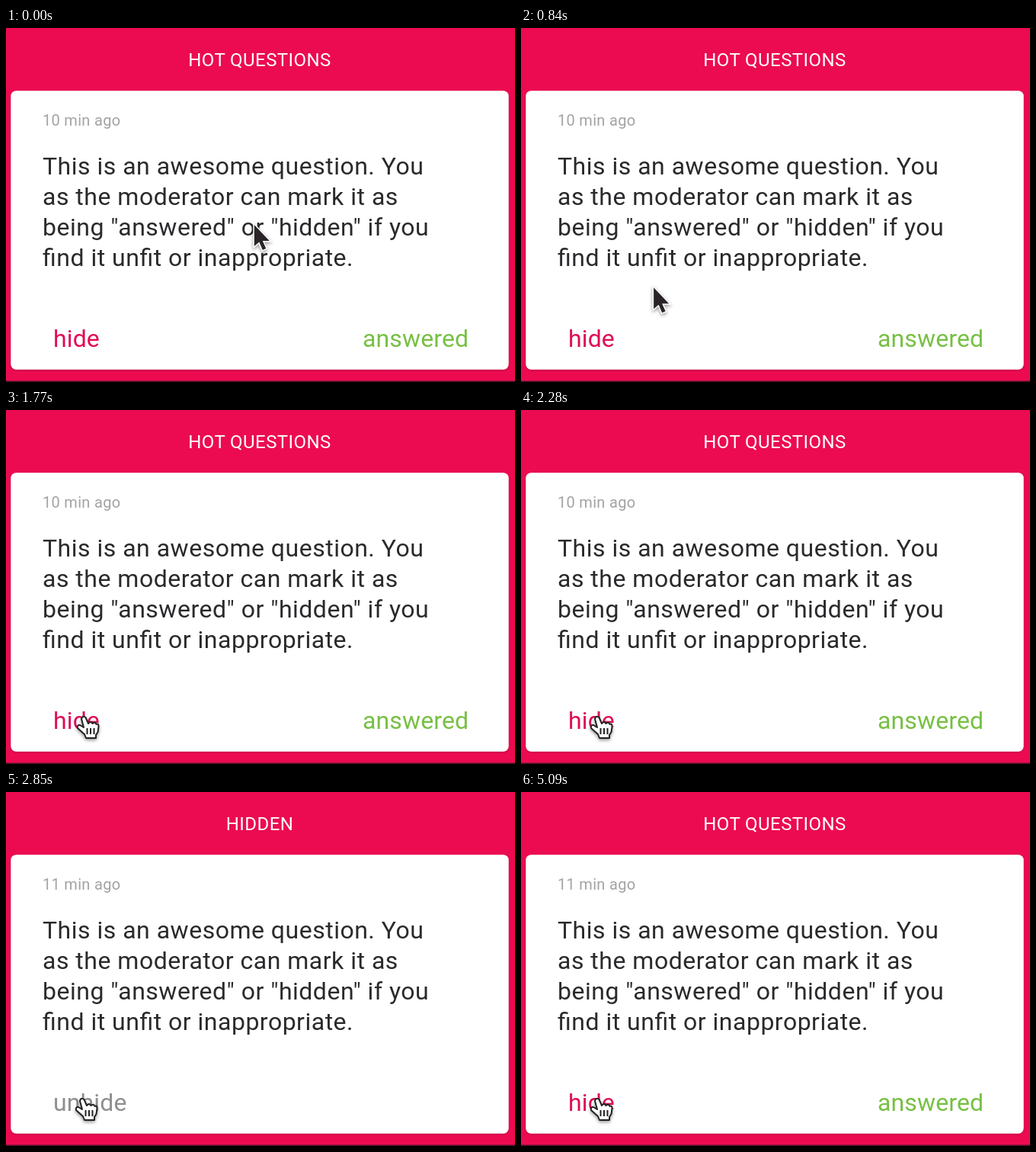
Write an HTML page that moves like this. It is 668 px wide and 464 px high and loops after 7090 ms.

```html
<!DOCTYPE html>
<html lang="en">
<head>
<meta charset="utf-8">
<title>Moderating a question</title>
<style>
  html, body { margin: 0; width: 100%; height: 100%; overflow: hidden; background: #ec0b51; }
  svg { display: block; width: 668px; height: 464px; }
  text { font: 32px Roboto, sans-serif; letter-spacing: .5px; fill: #2b292c; }
  #title { font-size: 24px; letter-spacing: .44px; fill: #fff; text-anchor: middle; }
  #age { font-size: 20px; letter-spacing: .3px; fill: #a3a3a3; }
  #action, #answered { letter-spacing: .13px; }
  #answered { fill: #77c043; }
  .shadow { filter: drop-shadow(0 2px 2px #0006); }
</style>
</head>
<body>
<svg viewBox="0 0 668 464">
  <rect width="668" height="464" fill="#ec0b51"/>
  <rect y="462.5" width="668" height="1.5" fill="#4a1428"/>
  <rect x="6.3" y="82.3" width="653.4" height="365.4" rx="7" fill="#fff" style="filter:drop-shadow(0 1px 1px #0003)"/>
  <text id="title" x="333" y="50"></text>
  <text id="age" x="48" y="128"></text>
  <text>
    <tspan x="48" y="192">This is an awesome question. You</tspan>
    <tspan x="48" y="232">as the moderator can mark it as</tspan>
    <tspan x="48" y="272">being "answered" or "hidden" if you</tspan>
    <tspan x="48" y="312">&#xFB01;nd it un&#xFB01;t or inappropriate.</tspan>
  </text>
  <text id="action" x="62" y="418"></text>
  <text id="answered" x="468" y="418">answered</text>
  <g id="ring" fill="none">
    <circle cx="100" cy="400" r="61" stroke="#fff" stroke-opacity=".6" stroke-width="5"/>
    <circle cx="100" cy="400" r="61" stroke="#232123" stroke-width="2.6"/>
  </g>
  <g id="arrow">
    <path class="shadow" d="M0 0V28L6.5 22.5 11 33 15.5 31 11 21H20Z" fill="#2a2429" stroke="#fff" stroke-width="3" paint-order="stroke"/>
  </g>
  <g id="hand" class="shadow" stroke="#222" stroke-width="2" stroke-linejoin="round">
    <path fill="#fff" d="M97 405Q98 400 102.500 403L106 411Q109 407 111.500 411 115 408 116.500 412 119.500 410 119.500 415L118.500 422 116 426V430H103L101 425 92 417Q91 412.500 95 413L100 416Z"/>
    <path d="M104.500 417V425M109 417V425M113.500 417V425"/>
  </g>
</svg>
<script>
const LOOP = 7090;
const HIDE_AT = 2820, UNHIDE_AT = 5060;
const PRESSES = [2610, 4850], PRESS_LENGTH = 150;
const $ = id => document.getElementById(id);
const show = (id, on) => $(id).setAttribute('visibility', on ? 'visible' : 'hidden');
// Share of the way still to go at time t
const left = (t, end, power) => Math.max(0, 1 - t / end) ** power;

function draw(time) {
  const t = time % LOOP;
  const hidden = t >= HIDE_AT && t < UNHIDE_AT;
  const x = 100 + 226 * left(t, 1950, 1.975);
  const y = 400 - 142 * left(t, 1750, 1.32);
  const overLink = y > 390;

  $('title').textContent = hidden ? 'HIDDEN' : 'HOT QUESTIONS';
  $('age').textContent = (t < HIDE_AT ? 10 : 11) + ' min ago';
  $('action').textContent = hidden ? 'unhide' : 'hide';
  $('action').style.fill = hidden ? '#8f8f8f' : '#e00b55';
  show('answered', !hidden);
  show('ring', PRESSES.some(p => t >= p && t < p + PRESS_LENGTH));

  show('arrow', !overLink);
  show('hand', overLink);
  $('arrow').setAttribute('transform', `translate(${x} ${y})`);
  // The hand settles along with the pointer
  $('hand').setAttribute('transform', `translate(${x - 100} ${y - 400})`);
}

const start = performance.now();
(function tick() {
  draw(performance.now() - start);
  requestAnimationFrame(tick);
})();
</script>
</body>
</html>
```
